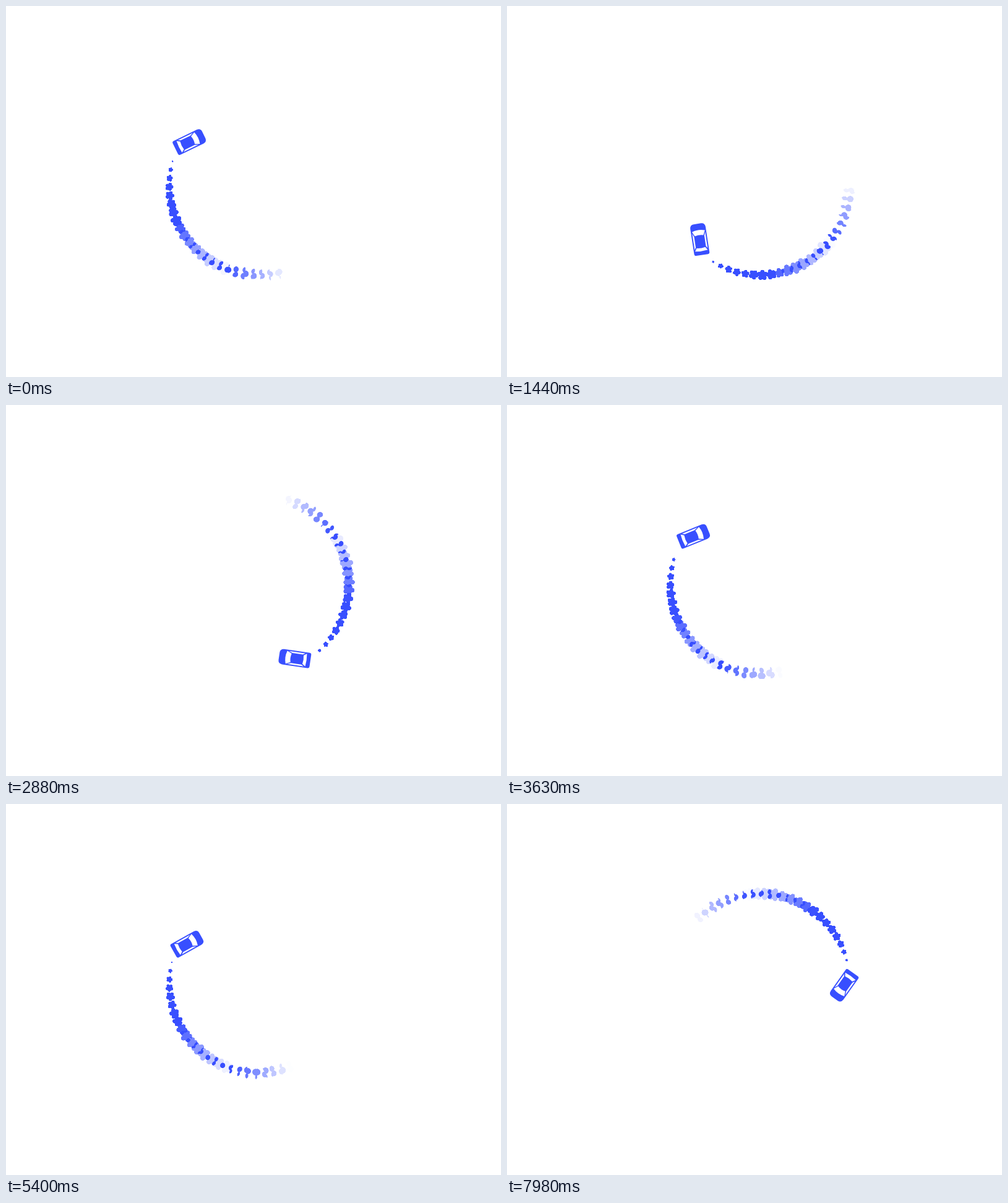
Recreate the animation shown at these times as an HTML page with a canvas. Size 800 by 600 pixels, loop 8 s.

```html
<!DOCTYPE html>
<html lang="en">
<head>
<meta charset="utf-8">
<title>Drifting car</title>
<style>
  html, body { margin: 0; width: 100%; height: 100%; overflow: hidden; background: #fff; }
  canvas, svg { position: absolute; left: 0; top: 0; width: 800px; height: 600px; }
  canvas { filter: url(#smoke); }
</style>
</head>
<body>
<canvas id="trail" width="800" height="600"></canvas>
<svg viewBox="0 0 800 600">
  <!-- Steep alpha contrast: thin smoke vanishes, overlaps linger. -->
  <filter id="smoke" x="0" y="0" width="100%" height="100%" color-interpolation-filters="sRGB">
    <feComponentTransfer><feFuncA type="linear" slope="4" intercept="-2"/></feComponentTransfer>
  </filter>
  <g id="car">
    <path fill="#384fff" d="M-22.5-12.5H19Q25.5-12 25.5-6V6Q25.5 12 19 12.5H-22.5Q-25.5 12.5-25.5 9.5V-9.5Q-25.5-12.5-22.5-12.5Z"/>
    <g fill="#fff">
      <path d="M6-7 13.5-10.5Q17 0 13.5 10.5L6 7Q8 0 6-7Z"/>
      <path d="M-13.5-7-18.5-10.3Q-20 0-18.5 10.3L-13.5 7Q-15 0-13.5-7Z"/>
      <path id="side" d="M-16-10.6H11L5-8.3H-12Z"/>
      <use href="#side" transform="scale(1 -1)"/>
    </g>
  </g>
</svg>
<script>
const LOOP = 8000, STEP = 30;
const TAU = Math.PI * 2;

// Angles in degrees, clockwise from the right.
const SPEED = 0.1994, START = 211.1, DRIFT = 33;
const CAR_ORBIT = { x: 411, y: 288.5, radius: 133.5 };
const PUFF_ORBIT = { x: 409, y: 290, radius: 145 };
const PUFF_START = 201, PUFF_GAP = 5.5, EXHAUST_LAG = 9.8;

// Puff ages count the puffs released since.
const FADE = 33, MAX_AGE = 25;

const car = document.getElementById('car');
const ctx = document.getElementById('trail').getContext('2d');

function random(seed, n) {
  const v = Math.sin(seed * 12.9898 + n * 78.233) * 43758.5453;
  return v - Math.floor(v);
}

function pointOn(orbit, degrees) {
  const a = degrees * TAU / 360;
  return { x: orbit.x + orbit.radius * Math.cos(a), y: orbit.y + orbit.radius * Math.sin(a) };
}

// Quick burst, then slow spreading.
const puffSize = age => 6.3 * age * age / (age * age + 4) + 0.3 * age;

function drawPuff(index, age) {
  const pos = pointOn(PUFF_ORBIT, PUFF_START + index * PUFF_GAP);
  const size = puffSize(age) * (0.96 + 0.16 * random(index, 1));
  const turn = random(index, 2) * TAU;
  const lobe = size * 0.42;

  ctx.globalAlpha = 1 - age / FADE;
  ctx.beginPath();
  ctx.arc(pos.x, pos.y, size * 0.68, 0, TAU);
  for (let i = 0; i < 5; i++) {
    const a = turn + i * TAU / 5;
    const reach = size * (0.52 + 0.14 * random(index, 3 + i));
    const x = pos.x + reach * Math.cos(a), y = pos.y + reach * Math.sin(a);
    ctx.moveTo(x + lobe, y);
    ctx.arc(x, y, lobe, 0, TAU);
  }
  ctx.fill();
}

function draw(t) {
  const angle = START + SPEED * t;
  const pos = pointOn(CAR_ORBIT, angle);
  car.setAttribute('transform', `translate(${pos.x} ${pos.y}) rotate(${angle + 90 + DRIFT})`);

  ctx.clearRect(0, 0, 800, 600);
  ctx.fillStyle = '#384fff';
  const released = (angle - EXHAUST_LAG - PUFF_START) / PUFF_GAP;
  const newest = Math.floor(released);
  for (let i = newest - MAX_AGE; i <= newest; i++) drawPuff(i, released - i);
}

const begin = performance.now();
function frame() {
  const t = (performance.now() - begin) % LOOP;
  draw(Math.floor(t / STEP) * STEP);
  requestAnimationFrame(frame);
}
frame();
</script>
</body>
</html>
```
